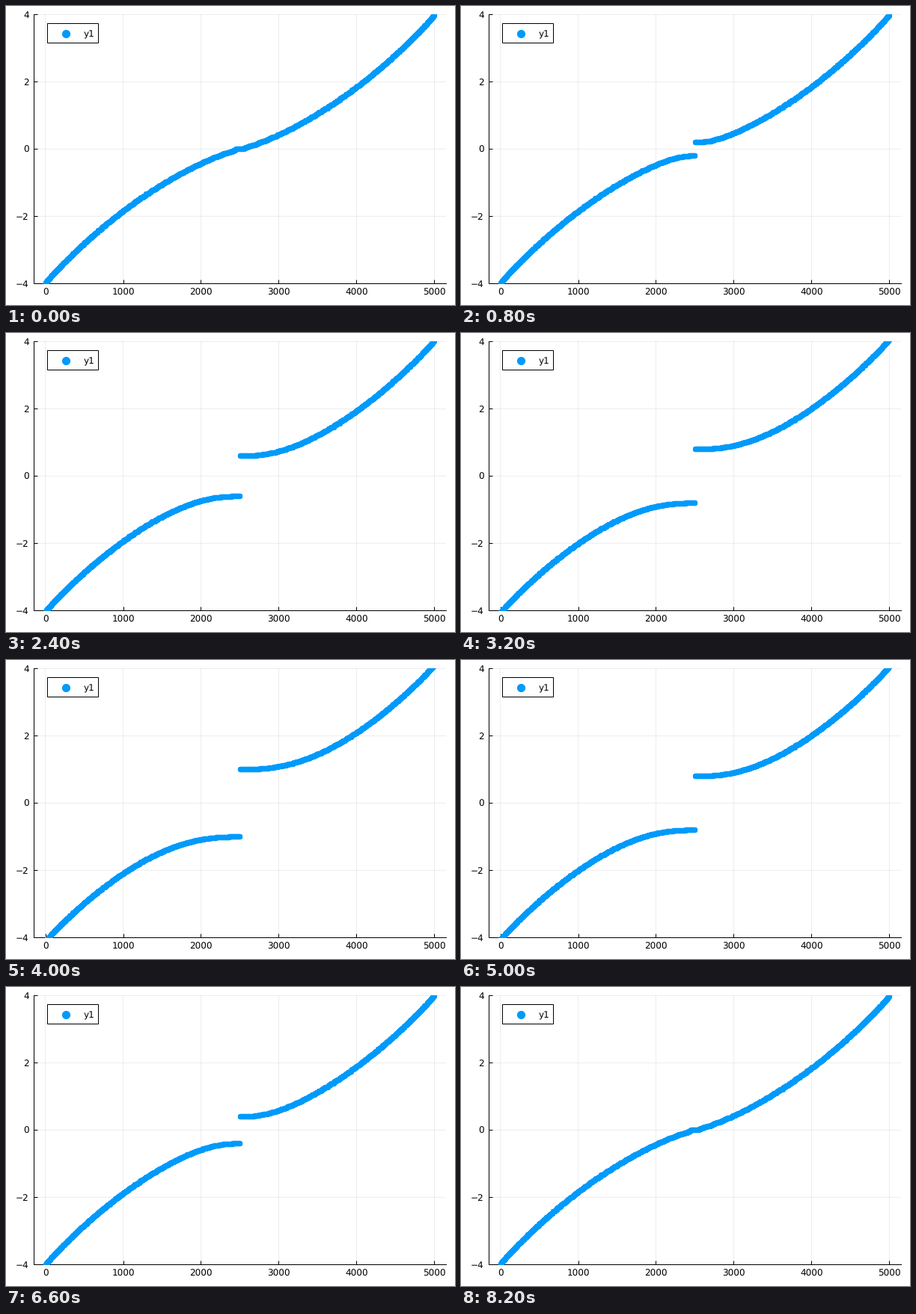
A matplotlib script that plays this animation: 600x400 px, repeating every 8.4 s.

```python
import numpy as np
import matplotlib.pyplot as plt
from matplotlib.animation import FuncAnimation
from matplotlib.patches import Rectangle

W, H, DPI = 600, 400, 100
PX = 72 / DPI                     # points per pixel
BLUE = "#009AFA"
LEFT, RIGHT, TOP, BOTTOM = 37.1, 587.9, 11.4, 371.2
SIDE = 50                         # lattice sites per side
STEPS = 21                        # gap values on the way up, and again down

plt.rcParams["font.family"] = "DejaVu Sans"
plt.rcParams["font.size"] = 12 * PX
plt.rcParams["text.hinting"] = "none"
plt.rcParams["text.hinting_factor"] = 1

# Square-lattice band energies with open edges
band = 2 * np.cos(np.pi * np.arange(1, SIDE + 1) / (SIDE + 1))
energy = np.abs(np.add.outer(band, band)).ravel()
index = np.arange(1, 2 * energy.size + 1)


def spectrum(mass):
    upper = np.sqrt(energy ** 2 + mass ** 2)
    return np.sort(np.concatenate([-upper, upper]))


fig = plt.figure(figsize=(W / DPI, H / DPI), dpi=DPI, facecolor="white")
ax = fig.add_axes([LEFT / W, 1 - BOTTOM / H, (RIGHT - LEFT) / W, (BOTTOM - TOP) / H])
margin = 0.03 * (index[-1] - index[0])
ax.set_xlim(index[0] - margin, index[-1] + margin)
ax.set_ylim(-4, 4)
ax.set_xticks(range(0, 5001, 1000))
ax.set_yticks(range(-4, 5, 2))
ax.set_axisbelow(True)
ax.grid(color="black", alpha=0.1, linewidth=0.5, snap=False)
ax.tick_params(direction="in", length=5 * PX, width=PX, pad=6.5 * PX)
for side in ("top", "right"):
    ax.spines[side].set_visible(False)
for side in ("left", "bottom"):
    ax.spines[side].set_linewidth(PX)
    ax.spines[side].set_zorder(1)

dots = ax.scatter(index, spectrum(0), s=(7.1 * PX) ** 2, color=BLUE,
                  linewidths=0, zorder=3)

# Legend, laid out in pixels from the top left
key = fig.add_axes([0, 0, 1, 1])
key.set_xlim(0, W)
key.set_ylim(H, 0)
key.axis("off")
key.add_patch(Rectangle((55.2, 23.2), 68.2, 26, facecolor="white",
                        edgecolor="black", linewidth=PX))
key.scatter([80], [36.5], s=(11.2 * PX) ** 2, color=BLUE, linewidths=0, zorder=3)
key.text(104, 41.3, "y1", ha="left", va="baseline")


def update(frame):
    step = min(frame, 2 * STEPS - 1 - frame)
    heights = spectrum(step / (STEPS - 1))
    dots.set_offsets(np.column_stack([index, heights]))
    return dots,


anim = FuncAnimation(fig, update, frames=2 * STEPS, interval=200,
                     repeat=True, repeat_delay=0, blit=False)
plt.show()
```
